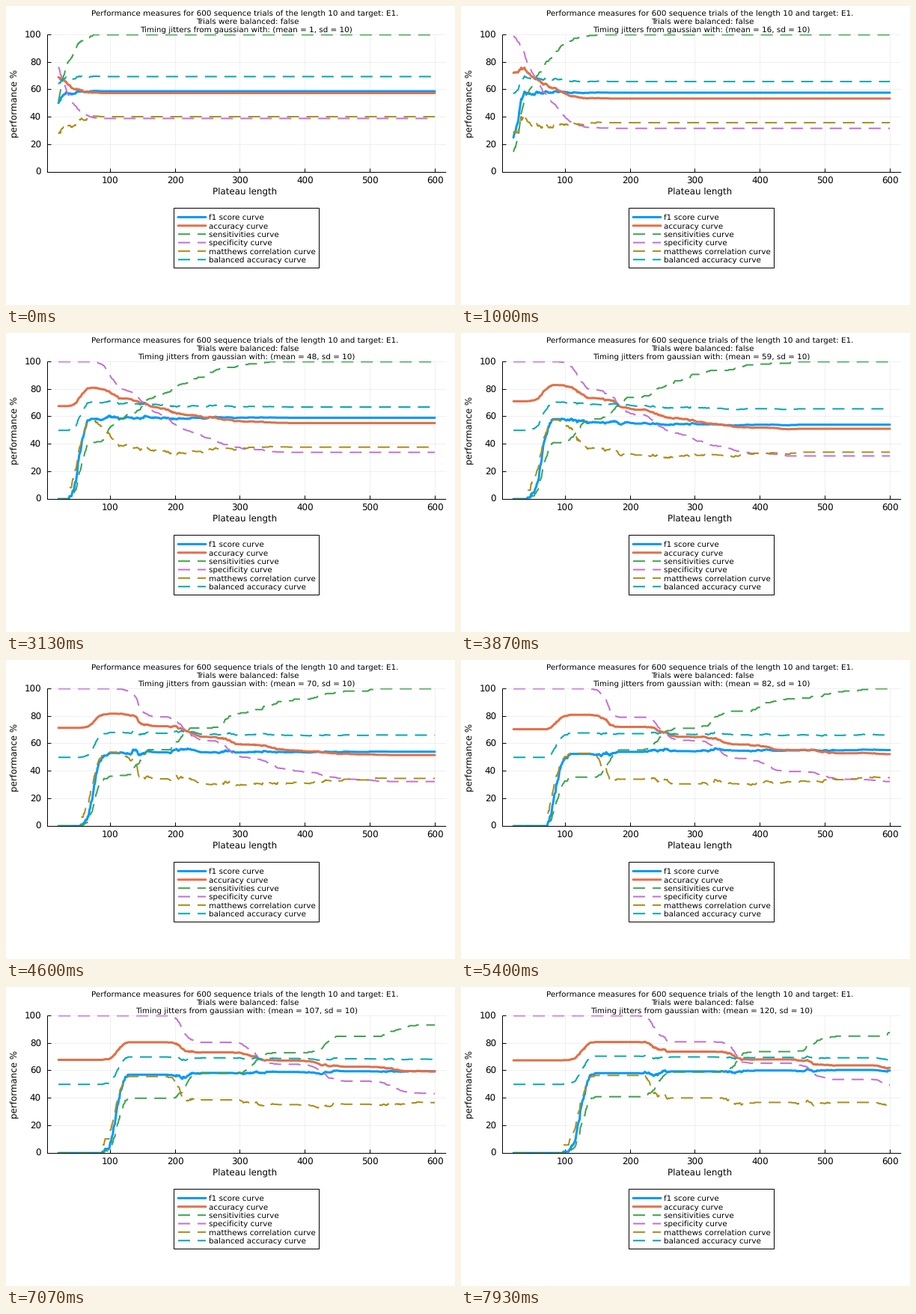
Write a matplotlib script that moves like this. It is 600x400 px and loops after 8000 ms.

```python
import numpy as np
import matplotlib.pyplot as plt
from matplotlib.animation import FuncAnimation
from matplotlib.patches import Rectangle

W, H, DPI = 600, 400, 100
PX = 72 / DPI
LOOP_MS, TICK_MS, LAST_MEAN = 8000, 32, 120
TRIALS = 600
LEFT, RIGHT, TOP, BOTTOM = 55, 588.2, 38.4, 222.1
XLIM = (2.6, 617.4)
SMALL, LARGE = 10.4 * PX, 11.9 * PX

plt.rcParams["font.family"] = "DejaVu Sans"
plt.rcParams["text.hinting"] = "none"
plt.rcParams["path.simplify"] = False
plt.rcParams["path.snap"] = False

SERIES = [
    ("f1 score curve", "#009afa", False),
    ("accuracy curve", "#e36f47", False),
    ("sensitivities curve", "#3ea44e", True),
    ("specificity curve", "#c371d2", True),
    ("matthews correlation curve", "#ac8e18", True),
    ("balanced accuracy curve", "#00aaae", True),
]

# Key points over the jitter mean
KEY_MEANS = np.array([1, 16, 29, 48, 70, 94, 120])
TARGET_SHARE = [.303, .319, .303, .323, .285, .28, .325]
FIRST_HITS = [.4, .4, .45, .41, .36, .39, .41]
LAST_SPEC = [.39, .318, .383, .34, .325, .38, .38]

STEPS = np.arange(1, 8)
LEFT_OVER = ((7 - STEPS) / 6) ** 2
PLATEAU = np.arange(20, 601)


def wander(rng, mean, keys, sd):
    """Value between the key points, with chance variation away from them."""
    gap = min(1, np.abs(KEY_MEANS - mean).min())
    return np.interp(mean, KEY_MEANS, keys) + gap * rng.normal(0, sd)


def count_detected(rng, n, rates, mean):
    """Trials detected at each plateau length; rates are cumulative per step."""
    step = np.searchsorted(rates, (np.arange(n) + 0.5) / n)
    step = step[step < len(STEPS)]
    centre = STEPS * np.hypot(mean, 8) + 5 * (STEPS == 1)
    needed = rng.normal(centre[step], 6 + 2 * STEPS[step])
    return np.searchsorted(np.sort(needed), PLATEAU, side="right").astype(float)


def measures(mean):
    rng = np.random.default_rng(1000 + mean)
    pos = round(TRIALS * wander(rng, mean, TARGET_SHARE, 0.016))
    neg = TRIALS - pos
    first = wander(rng, mean, FIRST_HITS, 0.025)
    last = wander(rng, mean, LAST_SPEC, 0.02)
    tp = count_detected(rng, pos, 1 - (1 - first) * LEFT_OVER, mean)
    fp = count_detected(rng, neg, (1 - last) * (1 - LEFT_OVER), mean)
    fn, tn = pos - tp, neg - fp
    sens, spec = tp / pos, tn / neg
    f1 = 2 * tp / (2 * tp + fp + fn)
    acc = (tp + tn) / TRIALS
    norm = np.sqrt((tp + fp) * pos * neg * (tn + fn))
    norm[norm == 0] = np.nan
    mcc = (tp * tn - fp * fn) / norm
    return [100 * v for v in (f1, acc, sens, spec, mcc, (sens + spec) / 2)]


fig = plt.figure(figsize=(W / DPI, H / DPI), dpi=DPI, facecolor="white")
stage = fig.add_axes([0, 0, 1, 1])
stage.set(xlim=(0, W), ylim=(H, 0))
stage.axis("off")
chart = fig.add_axes([LEFT / W, 1 - BOTTOM / H, (RIGHT - LEFT) / W, (BOTTOM - TOP) / H])
chart.set(xlim=XLIM, ylim=(0, 100))
chart.axis("off")


def label(x, y, text, size=SMALL, ha="center", va="baseline", **kw):
    return stage.text(x, y, text, fontsize=size, ha=ha, va=va, color="black", **kw)


def rule(x0, y0, x1, y1, **kw):
    stage.plot([x0, x1], [y0, y1], color="black", lw=PX, solid_capstyle="butt", **kw)


def style(color, dashed):
    if dashed:
        return dict(color=color, lw=2 * PX, linestyle=(0, (8, 5)), dash_capstyle="butt")
    return dict(color=color, lw=3 * PX, solid_capstyle="round")


def to_x(v):
    return LEFT + (v - XLIM[0]) / (XLIM[1] - XLIM[0]) * (RIGHT - LEFT)


def to_y(v):
    return BOTTOM - v / 100 * (BOTTOM - TOP)


def crisp(v):
    return np.floor(v) + 0.5


# Axes
x_axis, y_axis = crisp(BOTTOM), crisp(LEFT)
for v in range(100, 601, 100):
    x = crisp(to_x(v))
    rule(x, TOP, x, x_axis, alpha=0.06)
    rule(x, x_axis, x, x_axis - 5)
    label(to_x(v), 237.4, str(v), LARGE)
for v in range(0, 101, 20):
    y = crisp(to_y(v))
    rule(y_axis, y, RIGHT, y, alpha=0.06)
    rule(y_axis, y, y_axis + 5, y)
    label(47, to_y(v) + 4.2, str(v), LARGE, ha="right")
rule(y_axis, TOP, y_axis, x_axis + 0.5)
rule(y_axis, x_axis, RIGHT, x_axis)
label(319.3, 252, "Plateau length", LARGE)
label(11.3, 130, "performance %", LARGE, va="center", rotation=90)

# Title
label(319.3, 12.5, "Performance measures for 600 sequence trials of the length 10 and target: E1.")
label(323, 23.8, "Trials were balanced: false")
jitter = label(321.4, 35.2, "")

# Legend and curves
stage.add_patch(Rectangle((224.5, 270.5), 194, 80, fc="white", ec="black", lw=PX))
curves = []
for i, (name, color, dashed) in enumerate(SERIES):
    y = 282.5 + 11.35 * i
    stage.plot([230, 267], [y, y], **style(color, dashed))
    label(271, y + 3.6, name, ha="left")
    curves += chart.plot([], [], **style(color, dashed))


def mean_at(frame):
    """The mean climbs by one at evenly spaced times, rounded to 10 ms."""
    t = (frame * TICK_MS + TICK_MS - 1) // 10 * 10
    return 1 + int((t + 5) * LAST_MEAN / LOOP_MS)


def update(frame):
    mean = mean_at(frame)
    jitter.set_text(f"Timing jitters from gaussian with: (mean = {mean}, sd = 10)")
    for curve, values in zip(curves, measures(mean)):
        curve.set_data(PLATEAU, values)
    return curves + [jitter]


anim = FuncAnimation(fig, update, frames=LOOP_MS // TICK_MS, interval=TICK_MS,
                     repeat=True, repeat_delay=0, blit=False)
plt.show()
```
